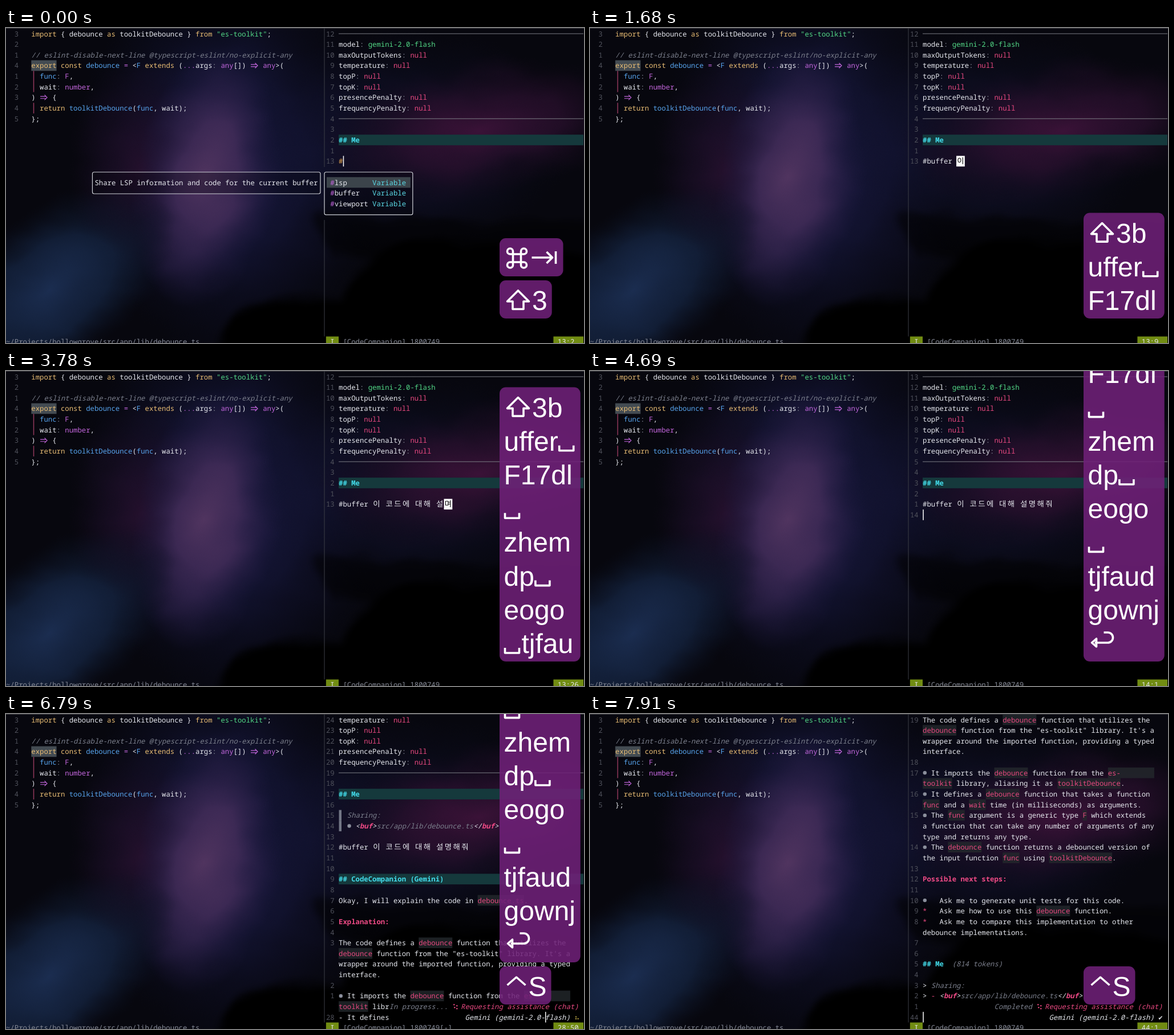
Write an HTML page that moves like this. It is 1013 px wide and 553 px high and loops after 8 s.

```html
<!DOCTYPE html>
<html lang="en">
<head>
<meta charset="utf-8">
<title>Editor chat</title>
<style>
html, body { margin: 0; width: 100%; height: 100%; overflow: hidden; background: #05050b; }
svg { position: absolute; left: 0; top: 0; width: 1013px; height: 553px; }
text {
  font: 12.3px "Noto Sans Mono", "DejaVu Sans Mono", monospace;
  white-space: pre; text-rendering: geometricPrecision; fill: #e6e8ee;
}
.n { fill: #50525c; }
.d { fill: #878b98; }
.i { fill: #7b7f8c; font-style: italic; }
.I { font-style: italic; }
.y { fill: #e9bd74; }
.o { fill: #e6a84f; }
.b { fill: #57a3ec; }
.v { fill: #c266dc; }
.g { fill: #52d886; }
.p, .c { fill: #e5487f; }
.P { fill: #e5487f; font-style: italic; }
.x { fill: #ee4a85; font-weight: 700; }
.X { fill: #ee4a85; font-weight: 700; font-style: italic; }
.h, .H { fill: #43dcea; font-weight: 600; }
.t { fill: #5bd8e4; }
.s { fill: #e9cf55; }
.k { font: 13.4px "Noto Sans CJK KR", "Noto Sans CJK", sans-serif; text-anchor: middle; }
.inv { fill: #000; }
.key { font: 48px "Liberation Sans", Arial, sans-serif; fill: #fff; }
.sym { fill: none; stroke: #fff; stroke-width: 3.6; stroke-linejoin: round; }
</style>
</head>
<body>
<svg viewBox="0 0 1013 553">
  <defs>
    <radialGradient id="navy"><stop stop-color="#1a1a42"/><stop offset=".5" stop-color="#141536" stop-opacity=".75"/><stop offset="1" stop-color="#0b0c20" stop-opacity="0"/></radialGradient>
    <radialGradient id="purple"><stop stop-color="#50345f"/><stop offset=".4" stop-color="#402b57" stop-opacity=".9"/><stop offset="1" stop-color="#1f1a42" stop-opacity="0"/></radialGradient>
    <radialGradient id="plum"><stop stop-color="#24102c"/><stop offset="1" stop-color="#180c20" stop-opacity="0"/></radialGradient>
    <radialGradient id="blue"><stop stop-color="#1b2d50"/><stop offset=".5" stop-color="#14233f" stop-opacity=".8"/><stop offset="1" stop-color="#0a1020" stop-opacity="0"/></radialGradient>
    <radialGradient id="wine"><stop stop-color="#3a1237"/><stop offset=".5" stop-color="#270f2b" stop-opacity=".8"/><stop offset="1" stop-color="#150a1c" stop-opacity="0"/></radialGradient>
    <filter id="paint" x="0" y="0" width="1" height="1" color-interpolation-filters="sRGB">
      <feTurbulence type="fractalNoise" baseFrequency=".007 .011" numOctaves="3" seed="4"/>
      <feDisplacementMap in="SourceGraphic" scale="40" xChannelSelector="R" yChannelSelector="G"/>
    </filter>
    <filter id="soft"><feGaussianBlur stdDeviation="7"/></filter>
  </defs>
  <g filter="url(#paint)">
    <rect x="-80" y="-80" width="1180" height="720" fill="#07070e"/>
    <ellipse cx="390" cy="230" rx="270" ry="350" fill="url(#navy)"/>
    <ellipse cx="700" cy="200" rx="300" ry="200" fill="url(#navy)" opacity=".5"/>
    <ellipse cx="235" cy="240" rx="130" ry="190" fill="url(#plum)"/>
    <ellipse cx="352" cy="262" rx="128" ry="240" fill="url(#purple)" transform="rotate(10 352 262)"/>
    <ellipse cx="75" cy="460" rx="255" ry="140" fill="url(#blue)" transform="rotate(-35 75 460)"/>
    <ellipse cx="825" cy="178" rx="290" ry="120" fill="url(#wine)" transform="rotate(-9 825 178)"/>
    <g fill="#010104" filter="url(#soft)">
      <path d="M590 620L600 450Q640 385 700 374L880 376L1100 410V640Z"/>
      <path d="M330 620L400 500Q470 465 600 470V640Z"/>
      <path d="M540 330L640 322L840 345L1060 338V400H560Z" opacity=".5"/>
    </g>
  </g>
</svg>
<svg id="left" viewBox="0 0 1013 553"></svg>
<svg id="right" viewBox="0 0 1013 553"></svg>
<script>
const LOOP = 8000, W = 7.38, H = 18.65, TEXT_X = 79 * W, LAST_ROW = 28;
const $ = id => document.getElementById(id);
const rowY = r => 0.7 + r * H;
const wide = ch => /[ㄱ-힣]/.test(ch);
const cols = s => [...s].reduce((n, ch) => n + (wide(ch) ? 2 : 1), 0);
const esc = s => s.replace(/&/g, '&amp;').replace(/</g, '&lt;');
const rect = (x, y, w, h, fill, more = '') =>
  `<rect x="${x}" y="${y}" width="${w}" height="${h}" fill="${fill}" ${more}/>`;
const line = (d, color, w = 1) => `<path d="${d}" fill="none" stroke="${color}" stroke-width="${w}"/>`;
const label = (s, x, r, cls) => `<text x="${x}" y="${rowY(r) + 13.8}" class="${cls}">${esc(s)}</text>`;

// Markup: ^cTEXT^ sets TEXT in class c; every other piece is plain.
const pieces = s => s.split('^').map((p, i) => i % 2 ? [p[0], p.slice(1)] : ['w', p]);
const raw = s => pieces(s).map(([c, p]) => c === 'c' ? '`' + p + '`' : p).join('').replace('●', '-');

function run(markup, x, r, max = 99) {
  let out = '';
  for (let [cls, str] of pieces(markup)) {
    str = str.slice(0, max);
    max -= str.length;
    if (cls === 'c') out += rect(x, rowY(r), str.length * W, H, '#24282c', 'opacity=".8"');
    for (const part of str.match(/[ㄱ-힣]|[●⇒]|[^ㄱ-힣●⇒]+/g) || []) {
      const y = rowY(r) + H / 2;
      if (part === '●') out += `<circle cx="${x + 3.8}" cy="${y}" r="3.2" fill="#8b8f9c"/>`;
      else if (part === '⇒') out += line(`M${x + 1} ${y - 1.8}h10M${x + 1} ${y + 1.8}h10M${x + 8.5} ${y - 4.5}l4.5 4.5l-4.5 4.5`, '#c266dc', 1.2);
      else if (wide(part)) out += label(part, x + W, r, 'k');
      else if (part.trim()) out += label(part, x, r, cls);
      x += cols(part) * W;
    }
  }
  return out;
}

function drawLeft() {
  const code = [
    '^yimport^ { debounce ^yas^ toolkitDebounce } ^yfrom^ ^g"es-toolkit"^;',
    '',
    '^i// eslint-disable-next-line @typescript-eslint/no-explicit-any^',
    '^yexport^ ^yconst^ ^bdebounce^ ^v=^ <^bF^ ^yextends^ (^v...^args^d:^ ^vany^[]) ^v⇒ ^ ^vany^>(',
    '  ^bfunc^^d:^ ^vF^,',
    '  wait^d:^ ^vnumber^,',
    ') ^v⇒ ^ {',
    '  ^yreturn^ ^btoolkitDebounce^(^bfunc^, wait);',
    '};'
  ];
  $('left').innerHTML = rect(0, 0, 1013, 1, '#3b3b40') +
    rect(6 * W, rowY(3), 6 * W, H, '#434b52') +
    line(`M48.5 ${rowY(4)}V${rowY(6)}M48.5 ${rowY(7)}V${rowY(8)}`, '#93395c', 1.5) +
    code.map((s, r) => label('' + (Math.abs(r - 3) || 4), 2 * W, r, 'n') + run(s, 6 * W, r)).join('') +
    run('^d~/Projects/hollowgrove/src/app/lib/debounce.ts^', 0, 29);
}

// Chat buffer: one entry per line, wrapped lines hold several rows.
const RULE = '―', ME = '^h## Me^';
const buf = '^I<^^Xbuf^^I>^^isrc/app/lib/debounce.ts^^I</^^Xbuf^^I>^';
const intro = [
  RULE, 'model^d:^ ^ggemini-2.0-flash^',
  ...['maxOutputTokens', 'temperature', 'topP', 'topK', 'presencePenalty', 'frequencyPenalty']
    .map(k => `${k}^d:^ ^pnull^`),
  RULE, '', ME, ''
];
const sharing = ['▌ ^iSharing:^', '▌ ● ' + buf, ''];
const reply = [
  'Okay, I will explain the code in ^cdebounce.ts^.', '',
  '^xExplanation:^', '',
  ['The code defines a ^cdebounce^ function that utilizes the',
   '^cdebounce^ function from the "es-toolkit" library. It\'s a',
   'wrapper around the imported function, providing a typed', 'interface.'], '',
  ['● It imports the ^cdebounce^ function from the ^ces-        ^',
   '^ctoolkit^ library, aliasing it as ^ctoolkitDebounce^.'],
  ['● It defines a ^cdebounce^ function that takes a function',
   '^cfunc^ and a ^cwait^ time (in milliseconds) as arguments.'],
  ['● The ^cfunc^ argument is a generic type ^cF^ which extends',
   'a function that can take any number of arguments of any', 'type and returns any type.'],
  ['● The ^cdebounce^ function returns a debounced version of',
   'the input function ^cfunc^ using ^ctoolkitDebounce^.'], '',
  '^xPossible next steps:^', '',
  '●   Ask me to generate unit tests for this code.',
  '^p*^   Ask me how to use this ^cdebounce^ function.',
  ['^p*^   Ask me to compare this implementation to other', 'debounce implementations.']
].map(l => [].concat(l));
const outro = ['', '', '^H## Me^  ^i(814 tokens)^', '', '> ^iSharing:^', '> ^p-^ ' + buf, '', ''];
const size = ls => ls.reduce((n, l) => n + 1 + l.reduce((m, r) => m + raw(r).length, 0), 0);
const MARK = size(reply.slice(0, 9)), END = size(reply);

// Typed keys: time, key, and the syllable in progress (two letters: the first is done).
const typing = ('140 b|280 u|350 f|490 f|630 e|770 r|1120 ␣|1400 F17|1540 d ㅇ|1680 l 이|1820 ␣|' +
  '1890 z ㅋ|1960 h 코|2030 e 콛|2100 m 코드|2240 d 등|2310 p 드에|2450 ␣|2800 e ㄷ|2870 o 대|' +
  '3010 g 댛|3080 o 대해|3220 ␣|3290 t ㅅ|3360 j 서|3500 f 설|3640 a 섦|3780 u 설며|3850 d 명|' +
  '4060 g 명ㅎ|4130 o 해|4270 w 햊|4340 n 해주|4480 j 줘|4690 ⏎').split('|').map(s => s.split(' '));
const KEY_ROWS = '⇧3b|uffer␣|F17dl|␣|zhem|dp␣|eogo|␣|tjfaud|gownj|⏎'.split('|');

function typed(t) {
  let text = '#', pre = '', keys = 2;
  for (const [at, key, syl] of typing) {
    if (t < +at) break;
    keys += key.length;
    if (syl) {
      // A two-letter entry finishes its first letter and starts the next.
      if (syl.length > 1) text += syl[0];
      pre = syl.slice(-1);
    } else if (key === '␣' || key === '⏎') {
      text += pre + (key === '␣' ? ' ' : '');
      pre = '';
    } else if (key !== 'F17') text += key;
  }
  return { text, pre, keys };
}

function revealed(t) {
  if (t < 7140) return MARK * (Math.floor((t - 6300) / 70) + 1) / 12 | 0;
  if (t < 7350) return MARK + 5;
  return MARK + 15 + (END - MARK - 15) * Math.min(1, Math.floor((t - 7350) / 70) / 6) | 0;
}

function streamed(n) {
  const out = [];
  for (const l of reply) {
    const full = size([l]);
    if (n >= full) { out.push(l); n -= full; continue; }
    const rows = [];
    for (const r of l.map(raw)) {
      rows.push(r.slice(0, n));
      n -= r.length;
      if (n <= 0) break;
    }
    return [...out, rows];
  }
  return out;
}

function chat(t, text) {
  if (t < 4690) return [...intro, text === '#' ? '^o#^' : text];
  if (t < 5600) return [...intro, text, ''];
  const lines = [...intro, ...sharing, text, ''];
  if (t < 6300) return lines;
  lines.push('', '^h## CodeCompanion (Gemini)^', '', ...streamed(t < 7840 ? revealed(t) : END));
  return t < 7840 ? lines : [...lines, ...outro];
}

function drawChat(t, lines, pre) {
  const rows = lines.flatMap((l, i) => [].concat(l).map((s, j) => ({ s, no: j ? 0 : i + 1 })));
  const cur = lines.length, skip = Math.max(0, rows.length - LAST_ROW - 1);
  const cut = t < 5600 ? 99 : t < 7840 ? 12 : 17;
  let out = '';
  rows.slice(skip).forEach(({ s, no }, r) => {
    const y = rowY(r);
    if (no) out += label(no === cur ? '' + no : ('' + (cur - no)).padStart(2), 76 * W, r, 'n');
    if (s === RULE) { out += line(`M${TEXT_X} ${y + 9.3}H1012`, '#7b7d84'); return; }
    if (s.startsWith('^h')) out += rect(TEXT_X, y, 1012 - TEXT_X, H, '#15393c');
    if (s[0] === '▌') { out += rect(TEXT_X + .5, y, 4.5, H, '#737786'); s = ' ' + s.slice(1); }
    out += run(s, TEXT_X, r, r >= 27 ? cut : 99);
  });
  const r = rows.length - 1 - skip, col = cols(pieces(rows.at(-1).s).map(p => p[1]).join(''));
  const x = TEXT_X + col * W;
  out += pre ? rect(x, rowY(r), 2 * W, H, '#fff') + label(pre, x + W, r, 'k inv')
             : rect(x + .3, rowY(r), 1.5, H, '#fff');
  return out + drawStatus(t, `${cur}:${col + 1}`);
}

function drawStatus(t, pos) {
  const olive = '#718c12', lock = t >= 5600 && t < 7840 ? '[-]' : '';
  return rect(76 * W, rowY(29), 3 * W, H, olive) + rect(130 * W, rowY(29), 52.6, H, olive) +
    run('I', 77 * W, 29) + run(`^d[CodeCompanion] 1800749${lock}^`, 80 * W, 29) + run(pos, 131 * W, 29);
}

function drawMenu(text) {
  const items = ['#lsp', '#buffer', '#viewport'].filter(s => s.startsWith(text));
  const hint = text === '#' ? 'Share LSP information and code for the current buffer'
                            : 'Share the current buffer with the LLM';
  const pad = Math.max(...items.map(s => s.length)) + 1;
  const w = (pad + 8) * W + 22, h = items.length * H + 19, dw = hint.length * W + 8.4;
  const frame = (x, bw, bh) => rect(x, 253, bw, bh, '#05060d', 'fill-opacity=".3" stroke="#cfd2d8" stroke-width="1.2" rx="3"');
  return frame(551 - dw, dw, 38) + run(hint, 551 - dw + 4, 14) + frame(558, w, h) +
    rect(562, rowY(14), w - 8, H, '#3c444b') +
    items.map((s, i) => run(`^v${text}^${s.slice(text.length).padEnd(pad - text.length)}^tVariable^`, 77 * W, 14 + i)).join('') +
    line(`M558 0V244M558 ${253 + h + 9}V541.5`, '#3d3e46');
}

function drawNotice(t) {
  const done = t >= 7840;
  const spin = '⠋⠙⠹⠸⠼⠴⠦⠧⠇⠏'[(107 + Math.floor((t - 5830) / 105)) % 10];
  const at = c => TEXT_X + c * W, y = rowY(27) + 9;
  const dots = [[1, -3], [6, -1], [2, 2], [6, 4]]
    .map(([a, b]) => `<circle cx="${at(27) + 2 + a}" cy="${y + b}" r="1.2" fill="#e5487f"/>`).join('');
  return (done ? run('^iCompleted^', at(17), 27) : run('^iIn progress...^', at(12), 27)) + dots +
    run('^PRequesting assistance (chat)^', at(29), 27) +
    run('^IGemini (gemini-2.0-flash)^ ' + (done ? '✔' : `^s${spin}^`), at(30), 28);
}

// Key caps: symbol outlines sit on the baseline, followed by their advance.
const SYM = {
  '⇧': ['M25-34L44-15H34.5V-1.5H15.5V-15H6Z', 49.5],
  '⌘': ['M16-10V-29A5 5 0 1 0 11-24H35A5 5 0 1 0 30-29V-5A5 5 0 1 0 35-10H11A5 5 0 1 0 16-5Z', 49],
  '⇥': ['M0-18H36M26-28L36-18L26-8M42-29V-7', 47],
  '␣': ['M2-9V0H27V-9', 31],
  '⏎': ['M28-36H35A9 9 0 0 1 35-18H12M7-18L15-25V-11Z', 49],
  '⌃': ['M6-19L22-33L38-19', 43]
};
const pen = document.createElement('canvas').getContext('2d');
pen.font = '48px "Liberation Sans", Arial, sans-serif';
const split = s => s.split(/([⇧⌘⇥␣⏎⌃])/).filter(Boolean);
const advance = p => SYM[p] ? SYM[p][1] : pen.measureText(p).width;
const keyWidth = s => split(s).reduce((n, p) => n + advance(p), 0);

function keyRows(n) {
  const rows = [];
  for (const full of KEY_ROWS) {
    if (n <= 0) break;
    const s = full.slice(0, n);
    n -= s.length;
    if (rows.at(-1) === '␣' && keyWidth('␣' + s) < 127) rows[rows.length - 1] += s;
    else rows.push(s);
  }
  return rows;
}

// Boxes are stacked from the bottom up.
function drawKeys(boxes) {
  let bottom = 510, out = '';
  for (const [rows, alpha] of boxes) {
    const h = rows.length * 59.2 + 7.8;
    if (alpha > 0) {
      out += `<g opacity="${alpha.toFixed(3)}">` +
        rect(865, bottom - h, Math.max(...rows.map(keyWidth)) + 15.5, h, '#6f2078', 'fill-opacity=".88" rx="11"');
      rows.forEach((s, i) => {
        const y = bottom - 15 - (rows.length - 1 - i) * 59.2;
        let x = 872.5;
        for (const p of split(s)) {
          out += SYM[p] ? `<path class="sym" d="${SYM[p][0]}" transform="translate(${x} ${y})"/>`
                        : `<text class="key" x="${x}" y="${y}">${p}</text>`;
          x += advance(p);
        }
      });
      out += '</g>';
    }
    bottom -= h + 7;
  }
  return out;
}

const fade = (t, from, to) => Math.max(0, Math.min(1, (to - t) / (to - from)));
let shown = '';

function draw(t) {
  const { text, pre, keys } = typed(t);
  const boxes = [[keyRows(keys), fade(t, 7420, 7700)], [['⌘⇥'], fade(t, 1100, 1260)]];
  if (t >= 5460) boxes.unshift([['⌃S'], 1]);
  const html = drawChat(t, chat(t, text), pre) +
    (t < 1120 ? drawMenu(text) : line('M558 0V541.5', '#3d3e46')) +
    (t >= 5600 ? drawNotice(t) : '') + drawKeys(boxes);
  if (html !== shown) $('right').innerHTML = shown = html;
}

function tick() {
  draw(performance.now() % LOOP);
  requestAnimationFrame(tick);
}
drawLeft();
tick();
</script>
</body>
</html>
```
